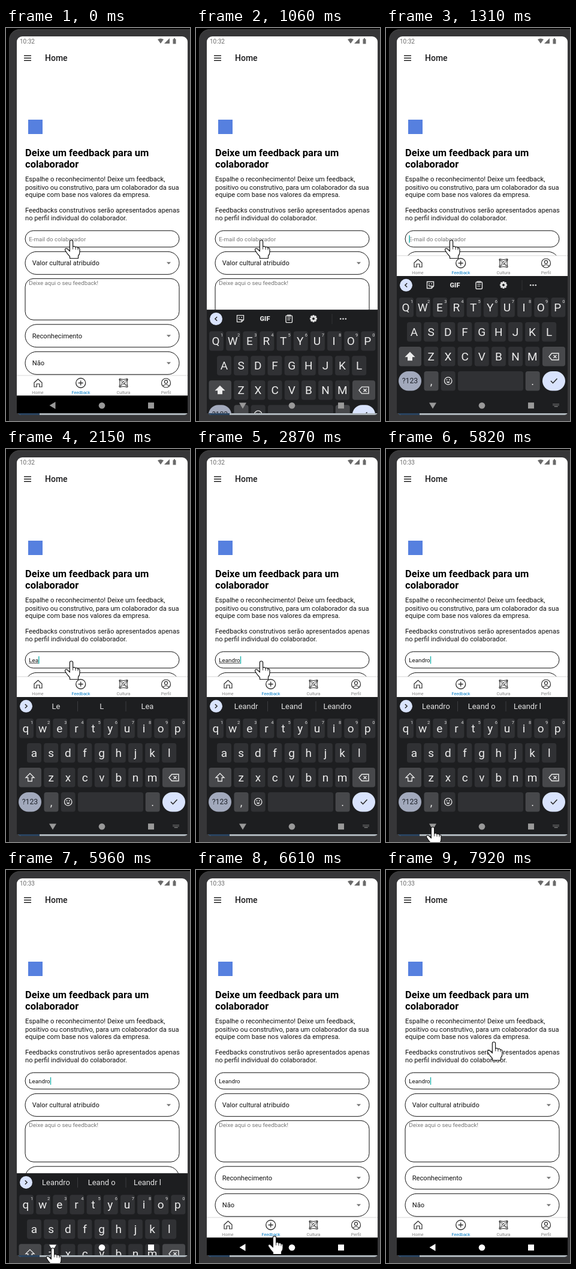
An HTML page with a canvas for the animation above (8000 ms loop, 307 by 656 pixels).

```html
<!DOCTYPE html>
<html lang="pt-BR">
<head>
<meta charset="utf-8">
<title>Feedback</title>
<style>
html, body { margin: 0; width: 100%; height: 100%; overflow: hidden; background: #000; }
canvas { display: block; width: 307px; height: 656px; }
</style>
</head>
<body>
<canvas id="stage"></canvas>
<script>
const W = 307, H = 656, LOOP = 8000;
const canvas = document.getElementById('stage');
const c = canvas.getContext('2d');
const dpr = window.devicePixelRatio || 1;
canvas.width = W * dpr;
canvas.height = H * dpr;

const NAME = 'Leandro';
const KEY_TIMES = [1640, 1930, 2080, 2210, 2420, 2600, 2780];
const SUGGEST_LAG = 210;
const CARET_TOGGLES = [500, 960, 1230, 3540, 4080, 4580, 5080, 5580, 5680, 6190, 6690, 7190, 7690];
const BACK_PRESS = 5680;
const POINTER = [
  [0, 109, 354], [4080, 109, 354], [4470, 118, 363], [4850, 112, 440], [4960, 112, 440],
  [5490, 78, 631], [6480, 78, 631], [6600, 131, 611], [6670, 131, 611],
  [7220, 152, 440], [7440, 152, 440], [7900, 180, 287], [8000, 180, 287]
];
const ROWS = [['qwertyuiop', 34, 450], ['asdfghjkl', 47, 491], ['zxcvbnm', 75.3, 532]];
const PITCH = 28.15;
const TABS = [['Home', 53], ['Feedback', 125], ['Cultura', 196], ['Perfil', 267]];

const clamp = x => Math.max(0, Math.min(1, x));
const ramp = (t, a, b) => clamp((t - a) / (b - a));
const easeOut = x => 1 - (1 - x) ** 3;
const smooth = x => x * x * (3 - 2 * x);
const passed = (list, t) => list.filter(x => x <= t).length;

function text(s, x, y, size, color = '#111', weight = 400, align = 'left') {
  c.font = `${weight} ${size}px Roboto, sans-serif`;
  c.textAlign = align;
  c.fillStyle = color;
  c.fillText(s, x, y);
}

function box(x, y, w, h, r, fill, stroke, lw = 1) {
  c.beginPath();
  c.roundRect(x, y, w, h, r);
  paint(fill, stroke, lw);
}

function disc(x, y, r, fill, stroke, lw = 1) {
  c.beginPath();
  c.arc(x, y, r, 0, Math.PI * 2);
  paint(fill, stroke, lw);
}

function path(d, x, y, fill, stroke, lw = 1) {
  c.save();
  c.translate(x, y);
  const p = new Path2D(d);
  if (fill) { c.fillStyle = fill; c.fill(p); }
  if (stroke) { c.strokeStyle = stroke; c.lineWidth = lw; c.stroke(p); }
  c.restore();
}

function paint(fill, stroke, lw) {
  if (fill) { c.fillStyle = fill; c.fill(); }
  if (stroke) { c.strokeStyle = stroke; c.lineWidth = lw; c.stroke(); }
}

function drawBody() {
  c.fillStyle = '#000';
  c.fillRect(0, 0, W, H);
  box(5.5, 2.5, 330, 680, 17, '#363638', '#444', 1);
  box(20, 636, 283, 10, [0, 0, 5, 5], '#adb5bb');
  box(20, 636, 36, 10, [0, 0, 0, 5], '#29435f');
}

function drawHeader(t) {
  const gray = '#6a6a6a';
  text(t < 5000 ? '10:32' : '10:33', 23, 26, 10, gray);
  path('M-5 -3Q0 -6 5 -3L0 4Z', 258, 22, gray);
  path('M4 -5V4H-5Z', 269, 22, gray);
  path('M-2.5 -3.5H-1V-5H1V-3.5H2.5V4.5H-2.5Z', 281, 22, gray);
  path('M0 0H12M0 4H12M0 8H12', 30, 46.2, null, '#222', 1.5);
  text('Home', 65, 55, 14, '#1c1c1e', 500);
}

function drawSelect(label, y) {
  box(32, y, 257, 38, 19, '#fff', '#111');
  text(label, 43.7, Math.round(y + 23), 11.15);
  path('M-3.6 -1.8H3.6L0 1.9Z', 271.5, y + 19.3, '#757575');
}

function drawForm(t) {
  box(37, 153, 24, 24, 0, '#5680df');
  text('Deixe um feedback para um', 32, 214, 16.55, '#000', 700);
  text('colaborador', 32, 233, 16.55, '#000', 700);
  text('Espalhe o reconhecimento! Deixe um feedback,', 32, 256, 11.15);
  text('positivo ou construtivo, para um colaborador da sua', 32, 270, 11.15);
  text('equipe com base nos valores da empresa.', 32, 282, 11.15);
  text('Feedbacks construtivos serão apresentados apenas', 32, 308, 11.15);
  text('no perfil individual do colaborador.', 32, 321, 11.15);

  drawEmail(t);
  drawSelect('Valor cultural atribuído', 373.3);
  box(32, 418.3, 257, 69, 14, '#fff', '#111');
  text('Deixe aqui o seu feedback!', 38.3, 429, 9.75, '#777');
  drawSelect('Reconhecimento', 494.8);
  drawSelect('Não', 540.3);
}

function drawEmail(t) {
  box(32, 338.3, 257, 27.4, 13.7, '#fff', '#111');
  const typed = NAME.slice(0, passed(KEY_TIMES, t));
  if (typed) text(typed, 38.3, 356, 9.75);
  else text('E-mail do colaborador', 38.3, 356, 9.75, '#757575');
  c.font = '400 9.75px Roboto, sans-serif';
  const w = typed ? c.measureText(typed).width : 0;
  if (typed && t < BACK_PRESS) {
    c.fillStyle = '#222';
    c.fillRect(38.3, 357.2, w, 0.8);
  }
  if (passed(CARET_TOGGLES, t) % 2) {
    c.fillStyle = '#1fb5b0';
    c.fillRect(38.4 + w, 346, 1.4, 12.5);
  }
}

function drawTabs(top) {
  c.fillStyle = '#fff';
  c.fillRect(18, top, 285, 33.5);
  c.fillStyle = '#d8d8d8';
  c.fillRect(18, top - 0.5, 285, 1);
  const y = top + 12.5, ink = '#2a2a2a';
  path('M-6.5 -0.5L0 -6.5L6.5 -0.5V6.5H2.2V1.5H-2.2V6.5H-6.5Z', 53.5, y, null, ink, 1.2);
  disc(124.7, y, 8, null, ink, 1.3);
  path('M-4 0H4M0 -4V4', 124.7, y, null, ink, 1.3);
  path('M-6 -7Q0 -5 6 -7L7 -6Q5 0 7 6L6 7Q0 5 -6 7L-7 6Q-5 0 -7 -6Z', 196, y, null, ink, 1.1);
  path('M-7 -5Q0 -6 5 6M6 -7Q6 0 -6 5M-6 -6Q-1 3 7 4M-5 7Q-4 -3 6 -5', 196, y, null, ink, 0.8);
  disc(267, y, 7.5, null, ink, 1.2);
  disc(267, y - 1.8, 2.6, null, ink, 1.1);
  path('M-5 5Q0 0 5 5', 267, y, null, ink, 1.1);
  for (const [label, x] of TABS)
    text(label, x, top + 31, 7.2, label === 'Feedback' ? '#087fc8' : '#858585', 400, 'center');
}

function drawToolbar() {
  const ink = '#e3e3e3';
  path('M-5.5 -5.5H5.5V2L2 5.5H-5.5ZM2 5.5V2H5.5M-3 0Q-1 3 1.5 1', 74, 429, null, ink, 1.4);
  disc(72, 427, 0.9, ink);
  disc(76, 427, 0.9, ink);
  text('GIF', 115, 433, 11, ink, 900, 'center');
  box(150, 424, 10.5, 11.5, 1.5, null, ink, 1.4);
  path('M-2.5 -6H2.5V-4H-2.5ZM-3 -1H3M-3 2H2', 155.2, 429, null, ink, 1.1);
  for (let i = 0; i < 8; i++) {
    c.save();
    c.translate(196, 429);
    c.rotate(i * Math.PI / 4);
    c.fillStyle = ink;
    c.fillRect(-1.5, -6, 3, 3);
    c.restore();
  }
  disc(196, 429, 3.3, null, ink, 2.6);
  c.fillStyle = '#303134';
  c.fillRect(226.5, 421, 1, 17);
  for (let i = -1; i < 2; i++) disc(245.5 + i * 4.3, 429.3, 1.3, ink);
}

function drawSuggestions(t) {
  const n = passed(KEY_TIMES, t - SUGGEST_LAG);
  const p = NAME.slice(0, n);
  const words = n === NAME.length
    ? [p, p.slice(0, 5) + ' o', p.slice(0, 6) + ' l']
    : [p, p.slice(0, -1), NAME.slice(0, n + 1)];
  if (n) words.forEach((w, i) => text(w, 83.5 + i * 76.2, 434, 12.9, '#e3e3e3', 400, 'center'));
  c.fillStyle = '#3c3d40';
  c.fillRect(119, 421, 1, 17);
  c.fillRect(199.5, 421, 1, 17);
}

function drawKeyboard(t) {
  const ink = '#ececec', key = '#303134', side = '#47484b', pale = '#d9e3fd', dark = '#1d1e20';
  const typing = t >= KEY_TIMES[0];
  c.fillStyle = dark;
  c.fillRect(18, 414, 285, 229);
  disc(33.5, 429.3, 10.5, pale);
  path(typing ? 'M-1.7 -3.3L1.7 0L-1.7 3.3' : 'M1.7 -3.3L-1.7 0L1.7 3.3', 33.5, 429.3, null, '#222', 1.4);
  if (typing) drawSuggestions(t); else drawToolbar();

  ROWS.forEach(([letters, x0, y], row) => [...letters].forEach((ch, i) => {
    const x = x0 + i * PITCH;
    box(x - 12, y, 24, 32.5, 4, key);
    text(typing ? ch : ch.toUpperCase(), x - (row ? 0 : 1), y + 23, 19, ink, 400, 'center');
    if (!row) text((i + 1) % 10, x + 9, y + 9, 7.5, '#ddd', 400, 'center');
  }));

  box(21.5, 532, 37.5, 32.5, 4, side);
  path('M0 -7L7 0H3.3V6H-3.3V0H-7Z', 40, 548.5, typing ? null : ink, ink, 1.3);
  box(261, 532, 38, 32.5, 4, side);
  path('M-8 0L-3.5 -5.5H8V5.5H-3.5ZM-0.5 -2.5L4.5 2.5M4.5 -2.5L-0.5 2.5', 280, 548.5, null, ink, 1.4);

  box(21, 573, 38, 32.5, 16.2, '#a2a9bc');
  text('?123', 40, 593, 12.3, '#20242c', 400, 'center');
  box(63.5, 573, 24, 32.5, 4, side);
  text(',', 75.5, 596, 18, ink, 400, 'center');
  box(91.7, 573, 24, 32.5, 4, key);
  disc(103.7, 589, 6.2, null, ink, 1.3);
  disc(101.5, 587.3, 1, ink);
  disc(105.9, 587.3, 1, ink);
  path('M-3.2 1.2Q0 5.8 3.2 1.2Z', 103.7, 589, ink);
  box(120, 573, 109, 32.5, 4, key);
  box(232.7, 573, 24, 32.5, 4, side);
  text('.', 244.7, 596, 18, ink, 400, 'center');
  box(261, 573, 38, 32.5, 16.2, pale);
  path('M-5 0L-1.5 3.7L5.5 -3.7', 280, 589, null, '#222', 1.5);

  c.fillStyle = '#8c8c8c';
  for (let i = 0; i < 10; i++) c.fillRect(278.5 + (i % 5) * 2.2, 627 + Math.floor(i / 5) * 2.1, 1.3, 1.2);
  c.fillRect(280.7, 631.2, 6, 1.2);
}

function drawNav(open, color) {
  path(open > 0.5 ? 'M-6 -4.5H6L0 5.5Z' : 'M4.5 -6V6L-5.5 0Z', 78, 630, color);
  disc(160, 630.2, 5.3, color);
  c.fillStyle = color;
  c.fillRect(237, 625.2, 10, 10);
}

function drawHand(t) {
  const i = Math.max(1, POINTER.findIndex(p => p[0] > t));
  const [t0, x0, y0] = POINTER[i - 1], [t1, x1, y1] = POINTER[i];
  const k = smooth(ramp(t, t0, t1));
  const x = x0 + (x1 - x0) * k, y = y0 + (y1 - y0) * k;
  c.lineJoin = 'round';
  path('M-2.6 2.4Q-2.6 0 0 0Q2.6 0 2.6 2.4V11Q5.5 9.5 7 11.8Q10 10.6 11 13.2Q14 12.4 14 15.5V20Q14 24 11.5 26.5V30.5H-2.5V27.5Q-7 23 -10.5 16.8Q-10.8 13 -7 14.3L-2.6 18.5Z', x, y, '#fff', '#151515', 1.2);
  path('M2.6 11V15.5M7 11.8V16M11 13.2V16.5', x, y, null, '#151515', 0.9);
}

function draw(t) {
  const open = easeOut(ramp(t, 960, 1230)) - easeOut(ramp(t, 5920, 6180));
  const raised = t >= 1160 && t < 5920;
  c.setTransform(dpr, 0, 0, dpr, 0, 0);
  c.lineJoin = 'miter';
  drawBody();

  c.save();
  c.beginPath();
  c.roundRect(18, 14, 285, 629, [9, 9, 0, 0]);
  c.clip();
  c.fillStyle = '#fff';
  c.fillRect(18, 14, 285, 629);
  drawHeader(t);
  drawForm(t);
  if (raised) {
    c.fillStyle = '#fff';
    c.fillRect(18, 380, 285, 233);
  }
  drawTabs(raised ? 380 : 580);
  c.fillStyle = '#000';
  c.fillRect(18, 613.5, 285, 30);
  if (open > 0) {
    c.save();
    c.translate(0, (1 - open) * 229);
    drawKeyboard(t);
    c.restore();
  }
  drawNav(open, t < 5920 ? '#999' : '#fff');
  c.restore();

  drawHand(t);
}

function tick() {
  draw(performance.now() % LOOP);
  requestAnimationFrame(tick);
}
tick();
</script>
</body>
</html>
```
